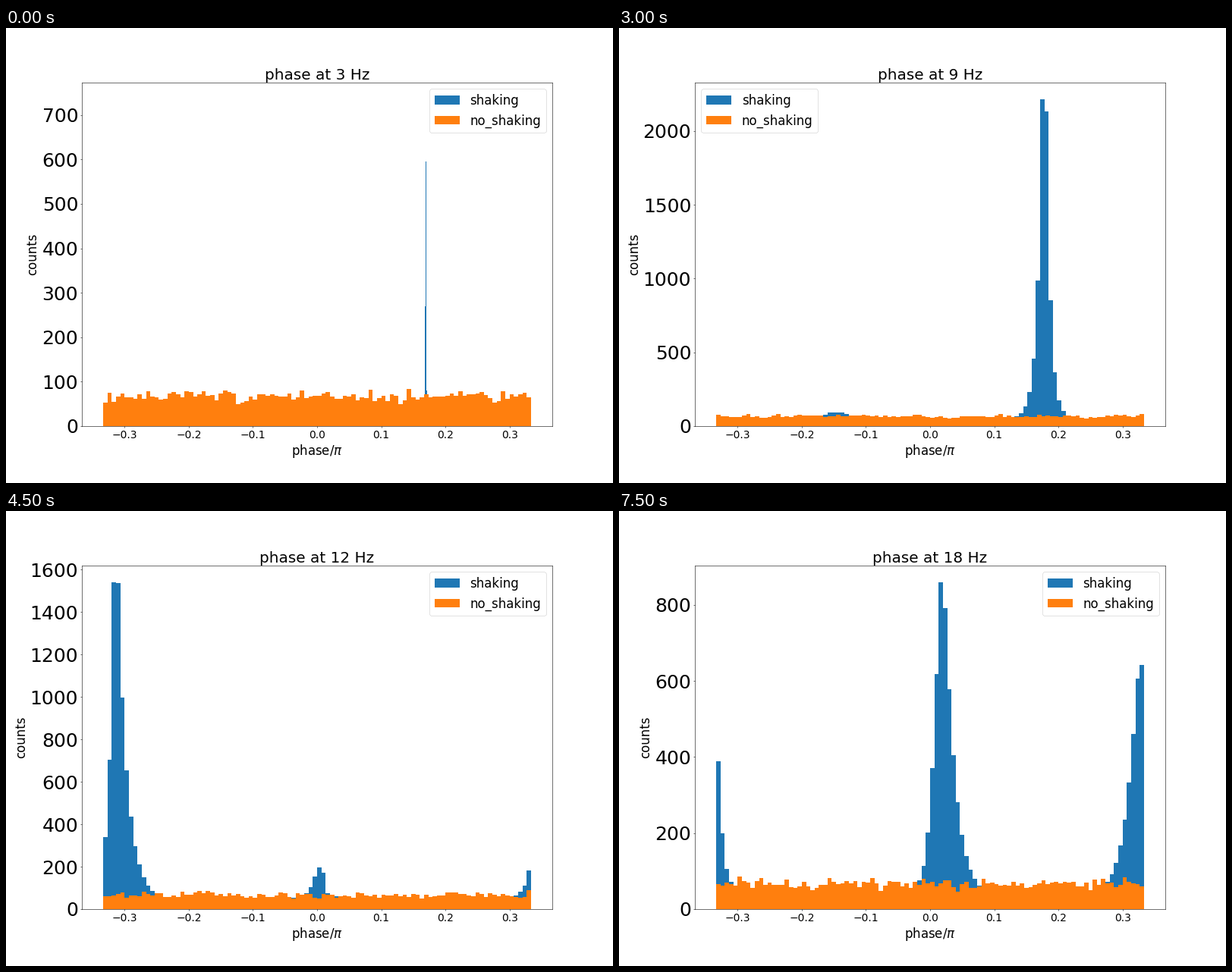
A matplotlib script for the animation above (8 s loop, 800 by 600 pixels).

```python
import numpy as np
import matplotlib.pyplot as plt
from matplotlib.animation import FuncAnimation

BLUE, ORANGE = "#1f77b4", "#ff7f0e"
BINS = 100
EDGE = 1 / 3
XLIM = 1.1 * EDGE
PIXEL = 2 * XLIM / 620
MEAN, FLOOR = 67, 60
STEP_MS, HOLD, STEPS = 500, 3, 16

plt.rcParams.update({
    "font.family": "DejaVu Sans",
    "font.size": 24,
    "xtick.labelsize": 20,
    "ytick.labelsize": 36,
})


def peak(centre, height, left, right):
    """Skewed bell on the circle of bins; each side is (width, power)."""
    d = (np.arange(BINS) - centre + BINS / 2) % BINS - BINS / 2
    width = np.where(d < 0, left[0], right[0])
    power = np.where(d < 0, left[1], right[1])
    bell = np.exp(-(np.abs(d) / width) ** power)
    floor = FLOOR * np.exp(-(d / 12) ** 4)
    return floor + (height - FLOOR) * bell / bell.max()


def scene(hz, top, tick, *peaks, span=(-EDGE, EDGE), loc="upper right"):
    shaking = np.max(peaks, axis=0)
    still = np.random.default_rng(hz).poisson(MEAN, BINS)
    return dict(hz=hz, top=1.05 * top, tick=tick, shaking=shaking,
                still=still, span=span, loc=loc)


SCENES = [
    # A peak so narrow that it covers three pixel columns.
    scene(3, 736, 100, [270, 596, 80], span=(142 * PIXEL, 145 * PIXEL)),
    scene(6, 4768, 1000, peak(0.45, 4768, (1.14, 4), (1.11, 4))),
    scene(9, 2218, 500,
          peak(76.51, 2218, (1.18, 1), (1.04, 1)),
          peak(27.7, 95, (3, 4), (3, 4)),
          span=(-0.3326, 0.3307), loc="upper left"),
    scene(12, 1542, 200,
          peak(2.35, 1542, (1.2, 1), (2.2, 1)),
          peak(50.5, 197, (2.3, 2), (1, 2))),
    scene(15, 568, 100,
          peak(27.6, 517, (3, 3), (3.9, 1.2)),
          peak(72.5, 568, (4.3, 1.25), (3.45, 4)),
          span=(-0.3324, 0.3262)),
    scene(18, 860, 200,
          peak(52.4, 860, (2.4, 1.65), (2.85, 1.25)),
          peak(98.7, 642, (3.1, 1.35), (1.75, 1.5))),
]


def bars(ax, counts, lo, hi, color, label):
    width = (hi - lo) / len(counts)
    left = lo + width * np.arange(len(counts))
    ax.bar(left, counts, width, align="edge", color=color, label=label)


fig = plt.figure(figsize=(16, 12), dpi=50, facecolor="white")
ax = fig.add_axes([0.125, 0.125, 0.775, 0.755])


def draw(step):
    s = SCENES[step // HOLD]
    ax.clear()
    bars(ax, s["shaking"], *s["span"], BLUE, "shaking")
    bars(ax, s["still"], -EDGE, EDGE, ORANGE, "no_shaking")
    ax.set_xticks(np.arange(-3, 4) / 10)
    ax.set_yticks(np.arange(0, s["top"], s["tick"]))
    ax.set_xlim(-XLIM, XLIM)
    ax.set_ylim(0, s["top"])
    ax.set_title(f"phase at {s['hz']} Hz")
    ax.set_xlabel(r"phase/$\pi$")
    ax.set_ylabel("counts")
    ax.legend(loc=s["loc"])
    return []


anim = FuncAnimation(fig, draw, frames=STEPS, interval=STEP_MS,
                     init_func=lambda: draw(0), repeat=True, repeat_delay=0)
plt.show()
```
